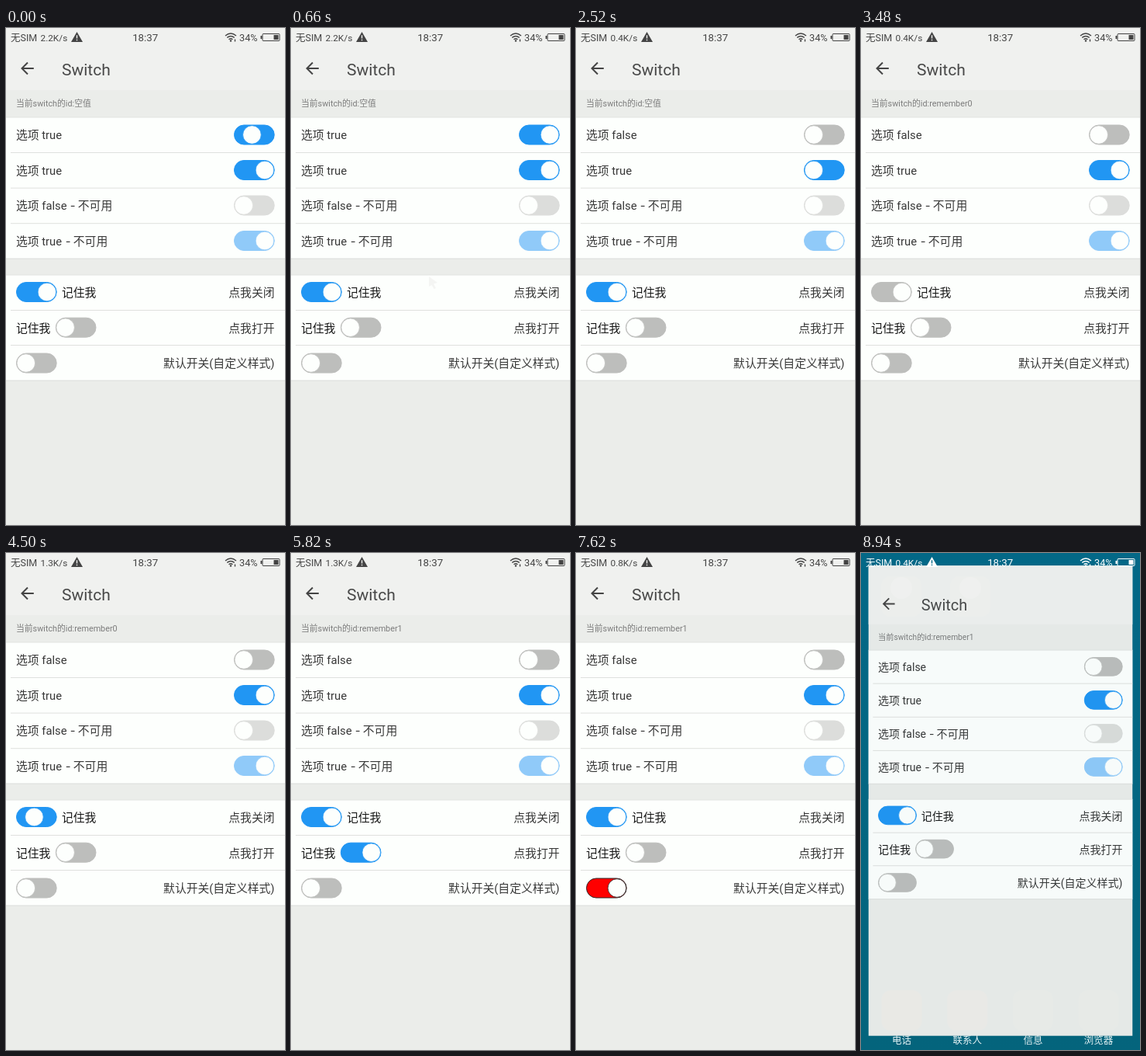
These frames come from a looping animation (360 by 640 pixels, 9 s). An HTML page:

```html
<!DOCTYPE html>
<html lang="zh">
<head>
<meta charset="utf-8">
<title>Switch</title>
<style>
html, body { margin: 0; width: 100%; height: 100%; overflow: hidden; background: #ebedea; }
svg { display: block; width: 360px; height: 640px; }
text { font-family: Roboto, "Noto Sans CJK SC", "Noto Sans CJK", sans-serif; white-space: pre; }
</style>
</head>
<body>
<svg id="stage" viewBox="0 0 360 640" xmlns="http://www.w3.org/2000/svg"></svg>
<script>
const LOOP = 9000, STEP = 60, SLIDE = 300;
const BLUE = '#2196f3', GREY = '#bdbebc', INK = '#383838';
const stage = document.getElementById('stage');

function add(parent, tag, attrs = {}, content) {
  const node = document.createElementNS('http://www.w3.org/2000/svg', tag);
  for (const key in attrs) node.setAttribute(key, attrs[key]);
  if (content !== undefined) node.textContent = content;
  parent.append(node);
  return node;
}
const rect = (parent, x, y, width, height, fill, rx = 0) =>
  add(parent, 'rect', { x, y, width, height, fill, rx });
const label = (parent, x, y, size, content, fill = INK, anchor = 'start') =>
  add(parent, 'text', { x, y, 'font-size': size, fill, 'text-anchor': anchor }, content);

// Launcher seen behind the closing page
const home = add(stage, 'g');
const defs = add(home, 'defs');
const teal = add(defs, 'linearGradient', { id: 'teal', x2: 0, y2: 1 });
add(teal, 'stop', { offset: 0, 'stop-color': '#036887' });
add(teal, 'stop', { offset: 1, 'stop-color': '#04647c' });
rect(home, 0, 0, 360, 640, 'url(#teal)');
for (const x of [52, 141]) {
  rect(home, x - 26, 30, 52, 52, '#4d8290', 12);
  add(home, 'circle', { cx: x, cy: 45, r: 14, fill: '#e8f0f0' });
}
[['电话', '#b2433c'], ['联系人', '#a8685c'], ['信息', '#4b9590'], ['浏览器', '#4a7480']].forEach(([name, fill], i) => {
  const x = 52.5 + i * 84.7;
  rect(home, x - 26, 563, 52, 52, fill, 12);
  label(home, x, 632, 12.5, name, '#e6f3f5', 'middle');
});

const page = add(stage, 'g');
rect(page, 0, 0, 360, 640, '#ebedea');
rect(page, 0, 0, 360, 80, '#f0f1ef');
add(page, 'path', { d: 'M35.8 52H21M28 44.5L20.5 52L28 59.5', fill: 'none', stroke: '#444', 'stroke-width': 2 });
label(page, 72, 60.8, 21, 'Switch', '#484848');
const idText = label(page, 13, 101.4, 10.8, '', '#7c7c7c');

function card(y, height, dividers) {
  rect(page, 0, y, 360, height, '#fdfffd');
  for (const d of dividers) rect(page, 6, d, 354, 1, '#dfe0de');
  rect(page, 0, y + height - 0.5, 360, 1, '#dcdddb');
  rect(page, 0, y - 0.5, 360, 1, '#e2e3e1');
}
card(115, 182, [160, 205.6, 251.2]);
card(318, 136, [363, 408]);

const options = [label(page, 13, 143.4, 14.8, ''), label(page, 13, 188.9, 14.8, '')];
function disabledLabel(y, value, dashX) {
  label(page, 13, y, 14.8, '选项 ' + value);
  label(page, dashX, y, 14.8, '-').style.fontFamily = 'Inter, sans-serif';
  label(page, dashX + 10, y, 14.8, '不可用');
}
disabledLabel(234.4, 'false', 82.8);
disabledLabel(280, 'true', 76.8);
label(page, 72, 346, 14.8, '记住我', '#161616');
label(page, 13, 391.5, 14.8, '记住我', '#161616');
label(page, 346.5, 346, 14.8, '点我关闭', INK, 'end');
label(page, 346.5, 391.5, 14.8, '点我打开', INK, 'end');
label(page, 346.5, 437, 14.8, '默认开关(自定义样式)', INK, 'end');

// Latest entry of a [time, value] list
const current = (list, t) => list.filter(([time]) => t >= time).pop();

function makeSwitch(x, y, toggles, on = BLUE, off = GREY, edge = on) {
  const track = add(page, 'rect', { x: x + 0.5, y: y - 12.5, width: 51.7, height: 25, rx: 12.5, 'stroke-width': 1 });
  const knob = add(page, 'circle', { cy: y, r: 11.8, fill: '#fdfffd', 'stroke-width': 0.8 });
  return t => {
    const [start, state] = current(toggles, t);
    const u = Math.min(1, (t - start) / SLIDE);
    const eased = 1 - (1 - u) ** 2;
    const position = state ? eased : 1 - eased;
    track.setAttribute('fill', state ? on : off);
    track.setAttribute('stroke', state ? edge : off);
    knob.setAttribute('stroke', state ? edge : off);
    knob.setAttribute('cx', x + 12.8 + 27.1 * position);
  };
}
const ALWAYS = -SLIDE, REMEMBER_0 = 3480, REMEMBER_1 = 5280;
const optionToggles = [
  [[-66, true], [1080, false]],
  [[ALWAYS, true], [1800, false], [2520, true]]
];
const switches = [
  makeSwitch(294, 137.5, optionToggles[0]),
  makeSwitch(294, 183, optionToggles[1]),
  makeSwitch(294, 228.5, [[ALWAYS, false]], BLUE, '#dcdddb'),
  makeSwitch(294, 274, [[ALWAYS, true]], '#90caf9'),
  makeSwitch(13, 340, [[ALWAYS, true], [REMEMBER_0, false], [4434, true]]),
  makeSwitch(63.8, 385.7, [[ALWAYS, false], [REMEMBER_1, true], [6180, false]]),
  makeSwitch(13, 431.5, [[ALWAYS, false], [7080, true], [7980, false]], '#ff0000', GREY, '#282828')
];
const pointer = add(page, 'path', { d: 'M178 320L189 328L184 329.5L187 335L184.5 336L181.5 331L178 333Z', fill: '#f4f5f3' });

const status = add(stage, 'g');
const ink = 'currentColor';
label(status, 6, 17, 12.5, '无SIM', ink);
const speed = label(status, 44.5, 16.7, 11.8, '', ink);
add(status, 'path', {
  d: 'M91.5 5L99 18H84ZM90.8 9.3V13.6H92.2V9.3ZM90.8 14.8V16.2H92.2V14.8Z',
  fill: ink, 'fill-rule': 'evenodd'
});
label(status, 179.7, 17, 13.3, '18:37', ink, 'middle');
add(status, 'path', {
  d: 'M283 10Q290 4 297 10M285.3 12.4Q290 8.4 294.7 12.4M287.5 14.8Q290 12.7 292.5 14.8M295.5 14.5V17.5',
  fill: 'none', stroke: ink, 'stroke-width': 1.4
});
add(status, 'circle', { cx: 290, cy: 16.5, r: 1.2, fill: ink });
label(status, 301, 16.8, 12.7, '34%', ink);
add(status, 'rect', { x: 331, y: 7.5, width: 22, height: 9, rx: 1, fill: 'none', stroke: ink });
rect(status, 328.5, 10, 2, 4, ink);
rect(status, 345.5, 9, 6, 6, ink);

const speeds = [[0, '2.2'], [840, '0.4'], [3900, '1.3'], [6900, '0.8'], [8400, '0.4']];
const ids = [[0, '空值'], [REMEMBER_0, 'remember0'], [REMEMBER_1, 'remember1']];

function draw(time) {
  const t = Math.floor((time % LOOP) / STEP) * STEP;
  speed.textContent = current(speeds, t)[1] + 'K/s';
  idText.textContent = '当前switch的id:' + current(ids, t)[1];
  options.forEach((node, i) => { node.textContent = '选项 ' + current(optionToggles[i], t)[1]; });
  for (const update of switches) update(t);
  pointer.setAttribute('visibility', t >= 600 && t < 780 ? 'visible' : 'hidden');

  const closing = Math.max(0, (t - 8820) / 120);
  const scale = 1 - 0.054 * closing;
  page.setAttribute('transform', `translate(180 ${320 - closing}) scale(${scale}) translate(-180 -320)`);
  page.setAttribute('opacity', 1 - 0.025 * closing);
  home.setAttribute('visibility', closing ? 'visible' : 'hidden');
  status.setAttribute('color', closing ? '#fff' : '#444');
}

const begin = performance.now();
function frame() {
  draw(performance.now() - begin);
  requestAnimationFrame(frame);
}
frame();
</script>
</body>
</html>
```
